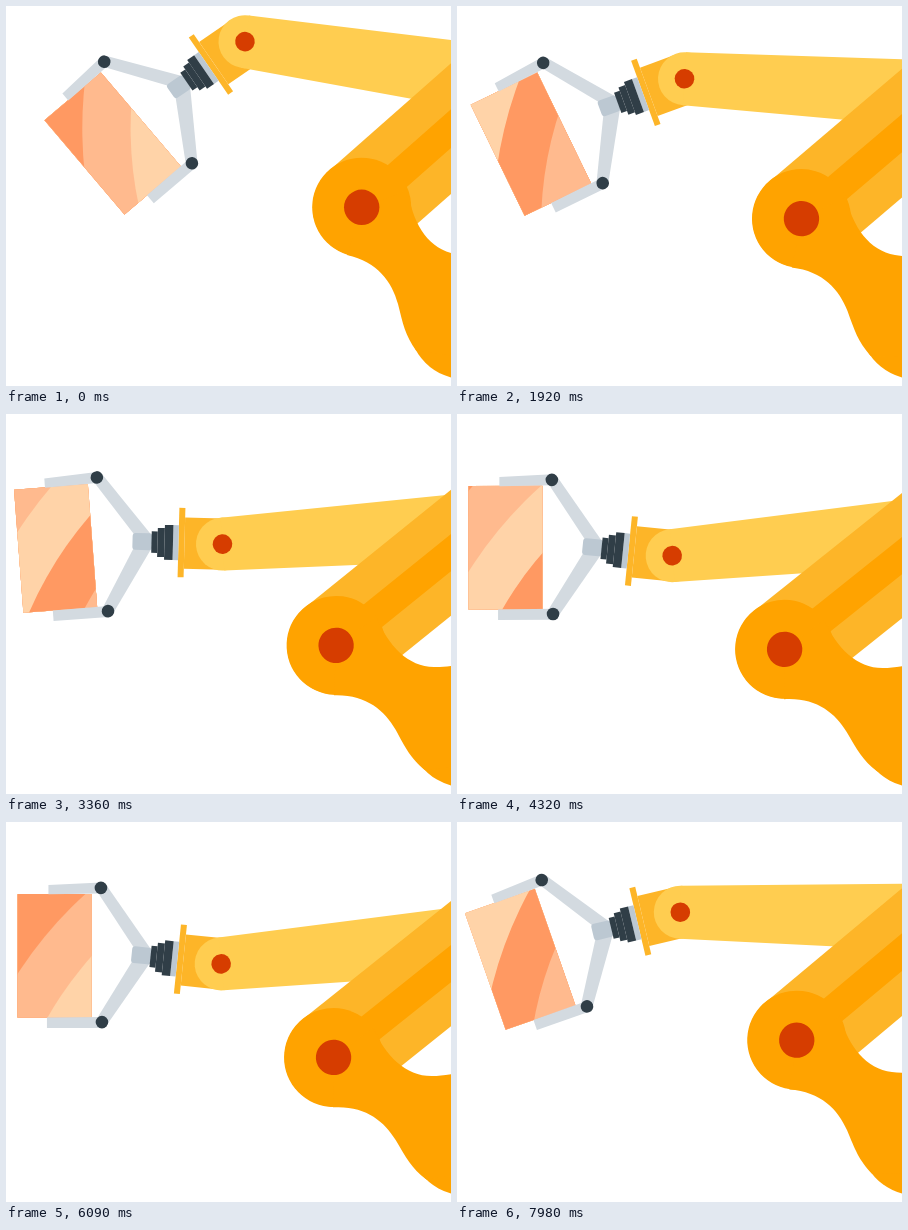
An HTML page with a canvas for the animation above (8000 ms loop, 445 px wide and 380 px high).

```html
<!DOCTYPE html>
<html lang="en">
<head>
<meta charset="utf-8">
<title>Robot arm</title>
<style>
  html, body { margin: 0; width: 100%; height: 100%; overflow: hidden; background: #fff; }
  canvas { display: block; }
</style>
</head>
<body>
<canvas id="stage" width="445" height="380"></canvas>
<script>
const ctx = document.getElementById('stage').getContext('2d');
const LOOP = 8000;
const color = {
  orange: '#ffa300', amber: '#fdb528', yellow: '#ffcd50', red: '#d63d00',
  dark: '#303e47', steel: '#bcc8d2', silver: '#d3dae0',
  bands: ['#ffba8e', '#ff9962', '#ffd3a8']
};
const rad = degrees => degrees * Math.PI / 180;

// Cubic Bezier ease (.5, 0, .5, 1) in closed form.
function ease(x) {
  x = Math.min(1, Math.max(0, x));
  const u = Math.sinh(Math.asinh(4 * x - 2) / 3);
  return 0.5 + 1.5 * u - 2 * u ** 3;
}

// 0 = raised, 1 = lowered.
const reach = t => ease(t / 4490) - ease((t - 6165) / 3720);

const polar = (from, length, degrees) => ({
  x: from.x + length * Math.cos(rad(degrees)),
  y: from.y + length * Math.sin(rad(degrees))
});

function at(point, degrees, draw) {
  ctx.save();
  ctx.translate(point.x, point.y);
  ctx.rotate(rad(degrees));
  draw();
  ctx.restore();
}

function disc(x, y, r, fill) {
  ctx.fillStyle = fill;
  ctx.beginPath();
  ctx.arc(x, y, r, 0, 2 * Math.PI);
  ctx.fill();
}

function rect(x, y, w, h, fill, radius = 0) {
  ctx.fillStyle = fill;
  ctx.beginPath();
  ctx.roundRect(x, y, w, h, radius);
  ctx.fill();
}

function shape(path, fill) {
  ctx.fillStyle = fill;
  ctx.fill(new Path2D(path));
}

// The helpers below draw around the wrist at the origin.
function drawMount() {
  rect(-38, -25.7, 38, 51.4, color.amber);
  rect(-44, -35.2, 6, 69.4, color.amber);
  rect(-49.5, -17.7, 5.5, 35, color.steel);
  rect(-58, -17.7, 8.5, 35, color.dark);
  rect(-65, -14.5, 7, 29, color.dark);
  rect(-71, -11, 6, 21.5, color.dark);
}

function drawBox(t) {
  ctx.save();
  ctx.translate(-203.7, -70);
  ctx.beginPath();
  ctx.rect(0, 0, 74, 123.5);
  ctx.clip();
  const radius = 415.6 - 0.02555 * t;
  for (let k = 8; k >= -2; k--) {
    disc(340, 300, Math.max(0, radius + 48.3 * k), color.bands[(k + 3) % 3]);
  }
  ctx.restore();
}

function drawGripper(t) {
  drawBox(t);
  shape('M-172.7-78.8L-120-81.5V-70.5L-172.7-69.7Z', color.silver);
  shape('M-174.2 53.5L-119 53V64H-174.2Z', color.silver);
  shape('M-123.7-72L-115.2-79.5L-69.7-14L-76-7L-85.7-14Z', color.silver);
  shape('M-124.2 54.5L-114.7 61.5L-70.5-2L-76-7L-88.7-3Z', color.silver);
  at({ x: 0, y: 0 }, 5.85, () => {
    rect(-90, -8.8, 19.5, 16.8, color.steel, 3);
    drawMount();
  });
  disc(-120.2, -76, 6.3, color.dark);
  disc(-119.2, 58.2, 6.3, color.dark);
}

function drawForearm() {
  disc(0, 0, 26.5, color.yellow);
  shape('M0-26.5L290-35V35L0 26.5Z', color.yellow);
  disc(0, 0, 9.8, color.red);
}

function drawUpperArm() {
  disc(0, 0, 49, color.amber);
  rect(0, -49, 240, 98, color.amber);
  rect(0, -14.5, 240, 29, color.orange);
}

// Drawn around the base pivot in the raised pose.
function drawBase() {
  disc(0, 0, 57.5, color.orange);
  disc(-104.3, -114.7, 49.5, color.orange);
  shape('M-58-132C-54-101-40-76-15-69C-5-66 10-64 30-64L30 40L-49.8 28.7' +
    'C-61 13-63 2-68-18C-74-40-88-60-119-67L-104-115Z', color.orange);
  disc(-104.3, -114.7, 17.7, color.red);
}

function drawScene(t) {
  const p = reach(t);
  const pivot = { x: 460, y: 316 };
  const armAngle = -41.4 + 2.8 * p;
  const forearmAngle = 8.6 - 14.2 * p;
  const shoulder = polar(pivot, 155, 227.74 - 16.4 * p);
  const elbow = polar(shoulder, 191, armAngle);
  const wrist = polar(elbow, -263, forearmAngle);

  ctx.clearRect(0, 0, 445, 380);
  at(wrist, -40.4 * (1 - p), () => drawGripper(t));
  at(wrist, forearmAngle, drawForearm);
  at(shoulder, armAngle, drawUpperArm);
  at(pivot, -16.4 * p, drawBase);
}

function frame() {
  drawScene(performance.now() % LOOP);
  requestAnimationFrame(frame);
}
frame();
</script>
</body>
</html>
```
